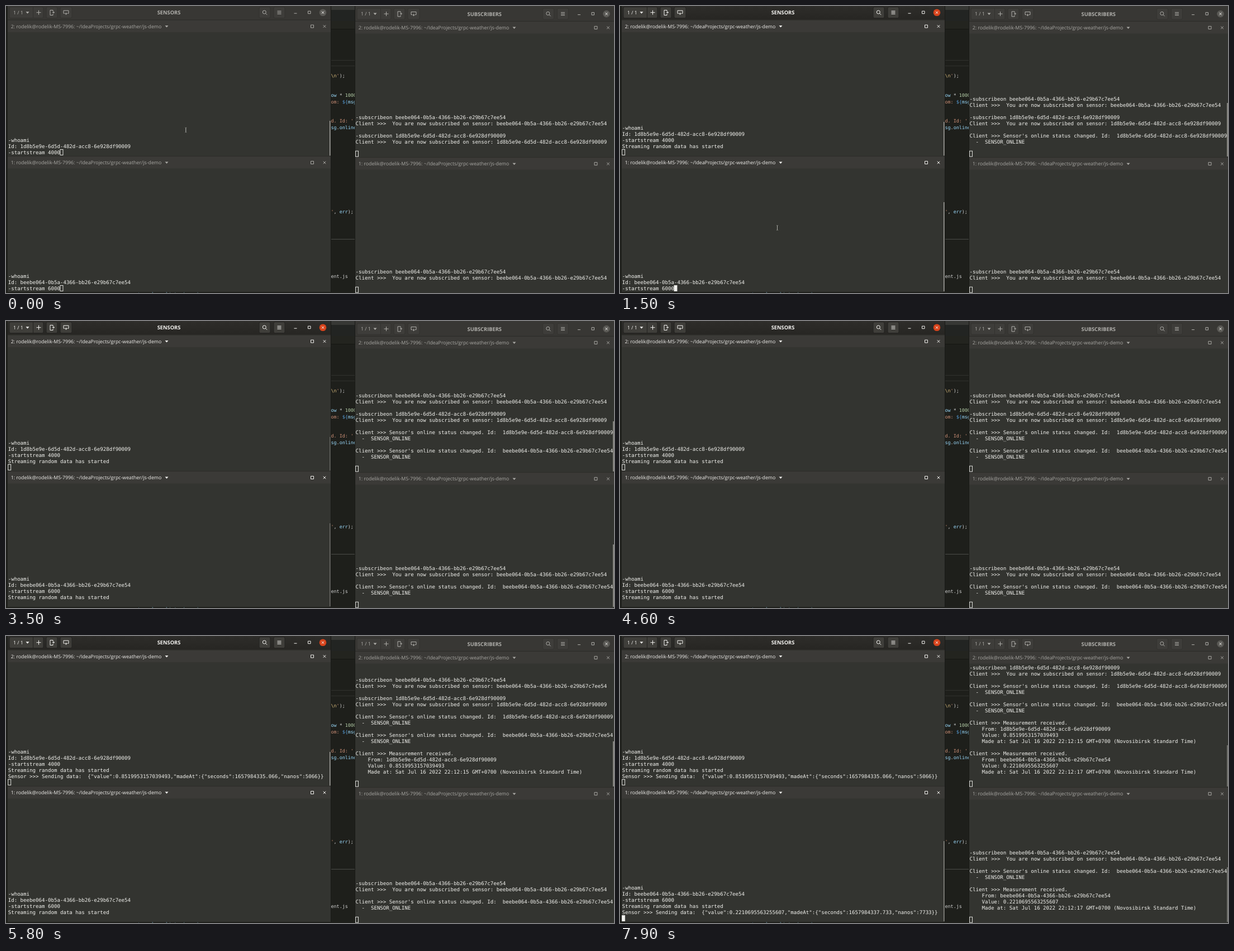
An HTML page that plays this animation: 1088 by 515 pixels, repeating every 8 s.

```html
<!DOCTYPE html>
<html lang="en">
<head>
<meta charset="utf-8">
<title>Sensor streams</title>
<style>
html, body { margin: 0; width: 100%; height: 100%; overflow: hidden; background: #1e1f1b; }
svg { display: block; width: 1088px; height: 515px; }
text { white-space: pre; text-rendering: geometricPrecision; }
.term { font: 9.115px "DejaVu Sans Mono", monospace; fill: #f2f2ee; }
.code { font: 8.4px "DejaVu Sans Mono", monospace; fill: #d4d4d4; }
.ui { font: 8.8px "Open Sans", sans-serif; fill: currentColor; }
.title { font: bold 9.3px "Open Sans", sans-serif; fill: currentColor; text-anchor: middle; }
.icon { fill: none; stroke: currentColor; stroke-width: 1; }
.fill { fill: currentColor; }
.str { fill: #ce9178; } .var { fill: #9cdcfe; } .num { fill: #b5cea8; }
.esc { fill: #d7ba7d; } .key { fill: #569cd6; }
</style>
</head>
<body>
<svg id="stage" viewBox="0 0 1088 515">
  <defs>
    <linearGradient id="active" x2="0" y2="1">
      <stop stop-color="#2e2d2a"/><stop offset="1" stop-color="#272623"/>
    </linearGradient>
  </defs>
</svg>
<script>
const LOOP = 8000, FRAME = 100, CHAR = 5.487, LINE = 11, ROWS = 20;
const stage = document.getElementById('stage');
const ID_A = '1d8b5e9e-6d5d-482d-acc8-6e928df90009';
const ID_B = 'beebe064-0b5a-4366-bb26-e29b67c7ee54';
const PATH = 'rodelik@rodelik-MS-7996: ~/IdeaProjects/grpc-weather/js-demo';

function add(markup) {
  const g = document.createElementNS('http://www.w3.org/2000/svg', 'g');
  g.innerHTML = markup;
  stage.append(g);
  return g;
}
const rect = (x, y, w, h, fill, more = '') =>
  `<rect x="${x}" y="${y}" width="${w}" height="${h}" fill="${fill}" ${more}/>`;
const text = (x, y, cls, s) => `<text x="${x}" y="${y}" class="${cls}">${s}</text>`;
const icon = (d, more = '') => `<path class="icon" d="${d}" ${more}/>`;
const span = (cls, s) => `<tspan class="${cls}">${s}</tspan>`;
const cross = (x, y, r) => icon(`M${x - r} ${y - r}l${2 * r} ${2 * r}m0 ${-2 * r}l${-2 * r} ${2 * r}`);
const caret = (x, y) => `<path class="fill" d="M${x - 3} ${y - 1.5}h6l-3 3.5z"/>`;

// Editor visible behind the two windows
function editor() {
  const line = (y, s) => text(581.5, y, 'code', s);
  return rect(0, 0, 1088, 515, '#1e1f1b')
    + rect(575, 0, 60, 7, '#363734') + rect(575, 7, 60, 20, '#222422')
    + rect(575, 27, 60, 14, '#23241f') + rect(575, 41, 60, 1, '#161713')
    + [97, 107].map(y => rect(575, y, 60, 1, '#30312d')).join('') + rect(575, 418, 60, 1, '#4b4c48')
    + line(128, span('esc', '\\n') + span('str', "'") + ');')
    + line(163, span('var', 'ow') + ' * ' + span('num', '1000'))
    + line(174.5, span('str', 'om: ') + span('key', '${') + span('var', 'msg'))
    + line(209, span('str', "d. Id: '"))
    + line(220.5, span('var', 'sg') + '.' + span('var', 'online'))
    + line(372, span('str', "'") + ', ' + span('var', 'err') + ');')
    + line(487.5, 'ent.js')
    + `<g opacity="0.6">${text(215, 520.3, 'code', span('key', 'const ') + span('var', 'reply = listen(rows)'))}</g>`;
}

// dx shifts left-aligned parts, rx right-aligned ones
function header(win, active) {
  const { dx, rx, dy, mid, name } = win;
  const y = 11.7 + dy, ink = active ? '#f4f3f0' : '#b0afab';
  const face = active ? '#3f3e3a' : '#3e3d3a', edge = active ? '#232220' : '#33322f';
  const button = (x, w) => rect(x, y - 10, w, 20, face, `rx="2.5" stroke="${edge}"`);
  const bx = 567 + rx;
  return `<g color="${ink}">`
    + rect(3 + dx, 0, 578 + rx - dx, 24.5 + dy, active ? 'url(#active)' : '#383734')
    + button(6 + dx, 61) + rect(48 + dx, y - 10, 1, 20, edge)
    + button(72 + dx, 20) + button(97 + dx, 21) + button(453 + rx, 20) + button(479 + rx, 20)
    + text(13 + dx, y + 3.2, 'ui', '1 / 1') + caret(38.5 + dx, y)
    + icon(`M${54.5 + dx} ${y}h8m-4 -4v8`)
    + icon(`M${84 + dx} ${y - 2.2}v-2h-5v9h5v-2.2m-1 -2.8h4m-2 -2v4`)
    + icon(`M${105 + dx} ${y + 1.5}h-2v-5h9v5h-2m-4.5 .6h4m-2 -2v4`)
    + `<circle class="icon" cx="${462.3 + rx}" cy="${y - 0.7}" r="3"/>` + icon(`M${464.5 + rx} ${y + 1.5}l2.7 2.7`)
    + icon(`M${485.5 + rx} ${y - 2.5}h7m-7 2.5h7m-7 2.5h7`)
    + icon(`M${515.5 + rx} ${y + 1.5}h5`) + icon(`M${540.5 + rx} ${y - 2.5}h4.5v4.5h-4.5z`)
    + `<circle cx="${bx}" cy="${y}" r="6.3" fill="${active ? '#d8431b' : '#5a5955'}"/>`
    + `<g color="#f4f3f0">${cross(bx, y, 2.1)}</g>`
    + text(mid, y + 3.4, 'title', name) + '</g>';
}

function paneBar(win, n, y, active) {
  const { dx, rx } = win;
  return `<g color="${active ? '#f1f0ed' : '#a9a8a4'}">`
    + rect(3 + dx, y - 11.5, 578 + rx - dx, 22, '#3b3a37')
    + rect(3 + dx, y - 12, 578 + rx - dx, 1, '#2d2c29')
    + text(8.7 + dx, y + 3, 'ui', `${n}: ${PATH}`) + caret(287.5 + dx, y)
    + icon(`M${545.5 + rx} ${y - 2.5}h5v5h-5z`) + cross(570 + rx, y, 2.3) + '</g>';
}

const chrome = (win, active) => header(win, active)
  + paneBar(win, 2, 36.5 + win.dy, active) + paneBar(win, 1, 281 + win.dy * 0.9, active);

const left = { dx: 0, rx: 0, dy: 0, mid: 291.5, name: 'SENSORS' };
const right = { dx: 622, rx: 507.5, dy: 2.4, mid: 856.3, name: 'SUBSCRIBERS' };

add(editor());
add(rect(3, 0, 578, 513, '#333430') + rect(625, 0, 463, 515, '#333430')
  + rect(581, 0, 1, 513, '#191a17') + rect(624, 0, 1, 515, '#191a17'));
add(chrome(left, false) + chrome(right, false));
const focused = add(chrome(left, true));

const whoami = (id, ms) => ['-whoami', 'Id: ' + id, '-startstream ' + ms];
const started = ['Streaming random data has started', ''];
const sending = (value, sec, nanos) =>
  [`Sensor >>> Sending data:  {"value":${value},"madeAt":{"seconds":${sec},"nanos":${nanos}}}`, ''];
const subscribed = id => ['-subscribeon ' + id, 'Client >>>  You are now subscribed on sensor: ' + id, '', ''];
const online = id => ["Client >>> Sensor's online status changed. Id:  " + id, '  -  SENSOR_ONLINE', '', ''];
const measured = (id, value, sec) => ['Client >>> Measurement received.', '    From: ' + id, '    Value: ' + value,
  `    Made at: Sat Jul 16 2022 22:12:${sec} GMT+0700 (Novosibirsk Standard Time)`, '', ''];
const VALUE_A = '0.8519953157039493', VALUE_B = '0.2210695563255607';

// log: time and lines that arrive; bar: time and thumb top; fade: time and thumb opacity
const panes = [
  { x: 3.7, base: 266, barX: 579, end: 268.5,
    log: [[0, whoami(ID_A, 4000)], [700, started], [4900, sending(VALUE_A, '1657984335.066', 5066)]],
    bar: [[0, 206], [700, 208]],
    fade: [[0, 1], [3000, 1], [3900, 0], [4800, 0], [5100, 1], [6900, 1], [7300, 0]] },
  { x: 3.7, base: 510, barX: 579, end: 512,
    log: [[0, whoami(ID_B, 6000)], [1600, started], [7600, sending(VALUE_B, '1657984337.733', 7733)]],
    bar: [[0, 352], [1600, 363], [7600, 368]],
    fade: [[1000, 0], [1300, 1], [3100, 1], [3900, 0], [7500, 0], [8000, 1]] },
  { x: 625.5, base: 268.7, barX: 1086.2, end: 270,
    log: [[0, [...subscribed(ID_B).slice(0, 3), ...subscribed(ID_A)]], [800, online(ID_A)], [1700, online(ID_B)],
      [5000, measured(ID_A, VALUE_A, 15)], [7700, measured(ID_B, VALUE_B, 17)]],
    bar: [[0, 174], [1700, 180], [5000, 189], [7700, 196]],
    fade: [[800, 0], [1300, 1], [3600, 1], [4400, 0], [4900, 0], [5300, 1], [6900, 1], [7300, 0], [7600, 0], [8000, 1]] },
  { x: 625.5, base: 512.7, barX: 1086.2, end: 513,
    log: [[0, subscribed(ID_B)], [1800, online(ID_B)], [7700, measured(ID_B, VALUE_B, 17)]],
    bar: [[0, 401], [7700, 415]],
    fade: [[1700, 0], [2100, 1], [3600, 1], [4400, 0], [7600, 0], [8000, 1]] },
];
for (const pane of panes) {
  pane.rows = add('');
  pane.cursor = add(rect(0, 0, 5, 10, 'none', 'stroke="#f2f2ee" stroke-width="0.9"')).firstChild;
  pane.thumb = add(rect(pane.barX, 0, 1.5, 10, '#a3a29d')).firstChild;
}

const beam = 'M-1.5 -4.5q1.5 0 1.5 1.5v6q0 1.5 -1.5 1.5M1.5 -4.5q-1.5 0 -1.5 1.5v6q0 1.5 1.5 1.5';
const pointer = add(`<path d="${beam}" fill="none" stroke="#22231f" stroke-width="1.6"/>`
  + `<path d="${beam}" fill="none" stroke="#d0d0cb" stroke-width="0.6"/>`);
const pointerX = [[800, 321.8], [1200, 281.5], [1500, 281.5], [2000, 279.7]];
const pointerY = [[800, 222.5], [1200, 398], [1500, 398], [2000, 395.7]];
const blinkOff = [[2200, 2800], [3400, 4000], [4600, 5100], [5800, 6400], [7000, 7600]];

function ramp(keys, t) {
  const i = keys.findIndex(k => k[0] > t);
  if (i < 0) return keys[keys.length - 1][1];
  if (i === 0) return keys[0][1];
  const [t0, a] = keys[i - 1], [t1, b] = keys[i];
  return a + (b - a) * (t - t0) / (t1 - t0);
}
const step = (keys, t) => keys.filter(k => k[0] <= t).pop()[1];

function drawPane(pane, t, solid, hidden) {
  const parts = pane.log.filter(entry => entry[0] <= t);
  if (pane.count !== parts.length) {
    pane.count = parts.length;
    // Output replaces the trailing empty prompt line
    const lines = parts.reduce((all, [, more]) =>
      all[all.length - 1] === '' ? [...all.slice(0, -1), ...more] : [...all, ...more], []).slice(-ROWS);
    pane.rows.innerHTML = lines.map((s, i) =>
      text(pane.x, pane.base - (lines.length - 1 - i) * LINE, 'term', s)).join('');
    pane.cursor.setAttribute('x', pane.x + lines[lines.length - 1].length * CHAR);
    pane.cursor.setAttribute('y', pane.base - 8.5);
  }
  pane.cursor.setAttribute('fill', solid ? '#f2f2ee' : 'none');
  pane.cursor.setAttribute('opacity', hidden ? 0 : 1);
  const top = step(pane.bar, t);
  pane.thumb.setAttribute('y', top);
  pane.thumb.setAttribute('height', pane.end - top);
  pane.thumb.setAttribute('opacity', ramp(pane.fade, t));
}

function draw(now) {
  const t = Math.floor(now % LOOP / FRAME) * FRAME;
  focused.setAttribute('opacity', ramp([[300, 0], [600, 1]], t));
  const active = t < 400 ? -1 : t < 1200 ? 0 : 1;
  const off = blinkOff.some(([a, b]) => t >= a && t < b);
  panes.forEach((pane, i) => drawPane(pane, t, i === active, i === 1 && off));
  pointer.setAttribute('transform', `translate(${ramp(pointerX, t)} ${ramp(pointerY, t)})`);
  pointer.setAttribute('opacity', t < 2400 ? 1 : 0);
}

function tick() {
  draw(performance.now());
  requestAnimationFrame(tick);
}
tick();
</script>
</body>
</html>
```
